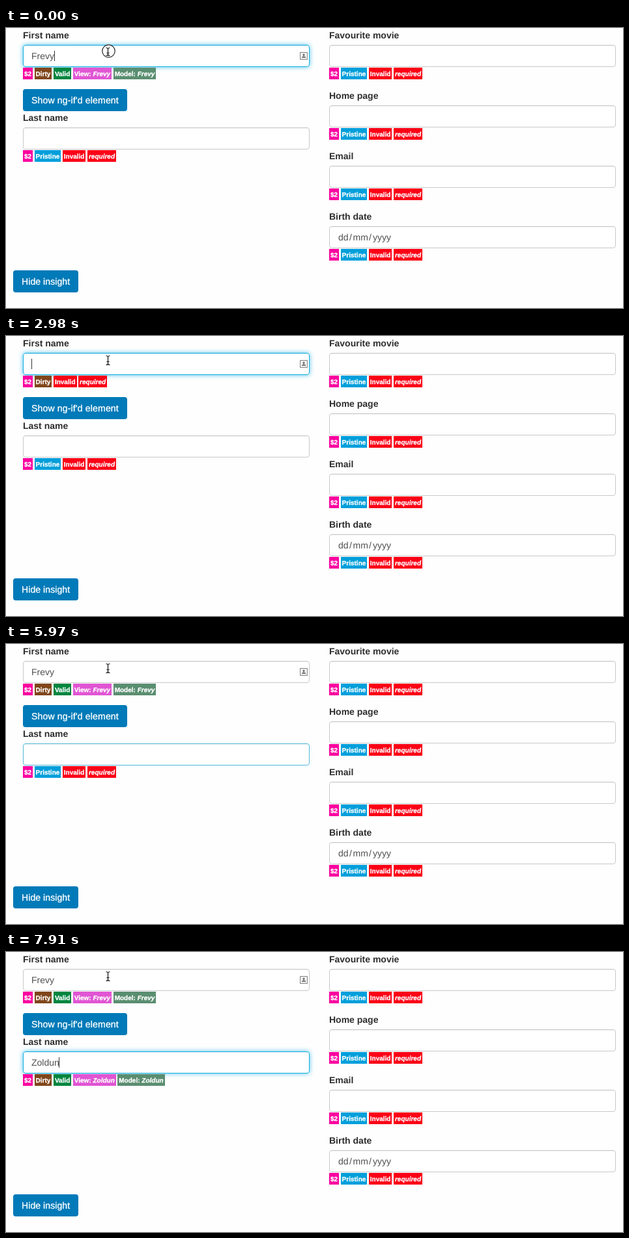
An HTML page with a canvas that plays this animation: 947x431 px, repeating every 8 s.

```html
<!DOCTYPE html>
<html lang="en">
<head>
<meta charset="utf-8">
<title>Form insight</title>
<style>
  html, body { margin: 0; width: 100%; height: 100%; overflow: hidden; background: #fefefe; }
  canvas { display: block; }
</style>
</head>
<body>
<canvas id="stage" width="947" height="431"></canvas>
<script>
const ctx = document.getElementById('stage').getContext('2d');
const LOOP = 8000;
const SANS = '"Liberation Sans", Arial, sans-serif';
const FONT = {
  label: `bold 14px ${SANS}`,
  body: `14px ${SANS}`,
  tag: `bold 10px ${SANS}`,
  tagItalic: `italic bold 10px ${SANS}`
};
const COLOR = {
  scope: '#fb009f', pristine: '#009fdb', dirty: '#80461b', valid: '#00853f',
  invalid: '#fc0016', view: '#e055d3', model: '#5a8e70'
};
const FIRST = 'Frevy';
const LAST = 'Zoldun';

// Each step overrides part of the state from its time onwards.
const STEPS = [
  [0, { first: FIRST, last: '', firstFocus: 1, lastFocus: 0, caret: 'first',
        click: true, pressed: false, selected: false }],
  [150, { click: false }],
  [450, { caret: '' }],
  [900, { caret: 'first' }],
  [1500, { caret: '' }],
  [1650, { firstFocus: 0.88, pressed: true }],
  [1800, { firstFocus: 0 }],
  [2390, { firstFocus: 0.55, pressed: false, selected: true }],
  [2540, { firstFocus: 1 }],
  [2980, { first: '', selected: false, caret: 'first' }],
  [3430, { first: FIRST.slice(0, 1) }],
  [3580, { first: FIRST.slice(0, 2) }],
  [4180, { caret: '' }],
  [4330, { first: FIRST.slice(0, 4), caret: 'first' }],
  [4930, { caret: '' }],
  [5080, { first: FIRST, caret: 'first' }],
  [5370, { firstFocus: 0.88, pressed: true, caret: '' }],
  [5520, { firstFocus: 0 }],
  [5970, { lastFocus: 0.55, pressed: false }],
  [6120, { lastFocus: 0.88, caret: 'last' }],
  [6260, { lastFocus: 1 }],
  [6710, { caret: '' }],
  [7010, { last: LAST.slice(0, 1), caret: 'last' }],
  [7160, { last: LAST.slice(0, 2) }],
  [7310, { last: LAST.slice(0, 3) }],
  [7610, { last: LAST.slice(0, 5) }],
  [7910, { last: LAST }]
];

function stateAt(time) {
  return Object.assign({}, ...STEPS.filter(([at]) => at <= time).map(step => step[1]));
}

function roundRect(x, y, w, h, r) {
  ctx.beginPath();
  ctx.roundRect(x, y, w, h, r);
}

function text(str, x, y, font, color, weight = 0, spacing = 0) {
  ctx.font = font;
  ctx.letterSpacing = `${spacing}px`;
  ctx.fillStyle = color;
  ctx.fillText(str, x, y);
  if (weight) {
    ctx.strokeStyle = color;
    ctx.lineWidth = weight;
    ctx.strokeText(str, x, y);
  }
  return ctx.measureText(str).width;
}

function widthOf(str, font) {
  ctx.font = font;
  ctx.letterSpacing = '0px';
  return ctx.measureText(str).width;
}

function mix(from, to, k) {
  return `rgb(${from.map((v, i) => Math.round(v + (to[i] - v) * k))})`;
}

function inputBox(x, y, focus = 0) {
  ctx.save();
  if (focus > 0.5) {
    ctx.shadowColor = `rgba(20,174,228,${0.75 * (focus - 0.5) * 2})`;
    ctx.shadowBlur = 7;
  }
  ctx.fillStyle = '#fff';
  roundRect(x, y, 440, 34, 4);
  ctx.fill();
  ctx.restore();
  ctx.fillStyle = 'rgba(0,0,0,0.05)';
  ctx.fillRect(x + 3, y + 1, 434, 1);
  ctx.strokeStyle = mix([200, 200, 200], [18, 174, 224], Math.min(1, focus * 1.15));
  ctx.lineWidth = 1;
  roundRect(x + 0.5, y + 0.5, 439, 33, 3.5);
  ctx.stroke();
}

function button(label, x, y, w, spacing, pressed) {
  if (pressed) {
    ctx.save();
    ctx.shadowColor = '#4ba6ee';
    ctx.shadowBlur = 4;
    ctx.fillStyle = '#69b5ee';
    roundRect(x - 1.5, y - 1.5, w + 3, 37, 4);
    ctx.fill();
    ctx.restore();
  }
  ctx.fillStyle = pressed ? '#005f91' : '#007ab8';
  roundRect(x, y, w, 34, 4);
  ctx.fill();
  text(label, x + 13, y + 22, FONT.body, '#fff', 0.35, spacing);
}

// A tag is [color, upright text, italic text].
function tags(x, y, list) {
  for (const [color, plain, italic = ''] of list) {
    const plainWidth = widthOf(plain, FONT.tag);
    const right = x + 4 + plainWidth + widthOf(italic, FONT.tagItalic);
    ctx.fillStyle = color;
    ctx.fillRect(Math.round(x), y, Math.round(right) - Math.round(x), 18);
    text(plain, x + 2, y + 13, FONT.tag, '#fff', 0.3);
    text(italic, x + 2 + plainWidth, y + 13, FONT.tagItalic, '#fff', 0.3);
    x = right + 2.5;
  }
}

function insight(value, dirty, minLength) {
  const list = [
    [COLOR.scope, '$2'],
    dirty ? [COLOR.dirty, 'Dirty'] : [COLOR.pristine, 'Pristine']
  ];
  if (value.length < minLength) {
    list.push([COLOR.invalid, 'Invalid'], [COLOR.invalid, '', value ? 'minlength' : 'required']);
    if (value) list.push([COLOR.view, 'View: ', value]);
  } else {
    list.push([COLOR.valid, 'Valid'], [COLOR.view, 'View: ', value], [COLOR.model, 'Model: ', value]);
  }
  return list;
}

function field(label, x, y, { value = '', dirty = false, minLength = 1, focus, caret, selected } = {}) {
  text(label, x, y - 10, FONT.label, '#2e2e2e');
  inputBox(x, y, focus);
  const valueWidth = widthOf(value, FONT.body);
  if (selected) {
    ctx.fillStyle = '#9dd2f8';
    ctx.fillRect(x + 13, y + 9, Math.round(valueWidth), 16);
  }
  text(value, x + 13, y + 22, FONT.body, '#505050');
  if (caret) {
    ctx.fillStyle = '#333';
    ctx.fillRect(x + 13 + Math.floor(valueWidth), y + 9, 1, 16);
  }
  tags(x, y + 35, insight(value, dirty, minLength));
}

function contactIcon(x, y) {
  ctx.strokeStyle = '#8b8b8b';
  ctx.lineWidth = 1.2;
  ctx.strokeRect(x + 0.6, y + 0.6, 10.8, 10.8);
  ctx.fillStyle = '#777';
  ctx.beginPath();
  ctx.arc(x + 6, y + 4.3, 1.7, 0, Math.PI * 2);
  ctx.fill();
  ctx.fillRect(x + 5.2, y + 5, 1.6, 2);
  ctx.fillRect(x + 3, y + 7, 6, 2);
}

function beam(x, y, half) {
  ctx.beginPath();
  for (const side of [-1, 1]) {
    ctx.moveTo(x - 3, y + side * half);
    ctx.quadraticCurveTo(x, y + side * half, x, y + side * (half - 2));
    ctx.quadraticCurveTo(x, y + side * half, x + 3, y + side * half);
  }
  ctx.moveTo(x, y - half + 1);
  ctx.lineTo(x, y + half - 1);
  ctx.moveTo(x - 2, y + 2);
  ctx.lineTo(x + 2, y + 2);
  ctx.strokeStyle = '#fff';
  ctx.lineWidth = 3;
  ctx.stroke();
  ctx.strokeStyle = '#111';
  ctx.lineWidth = 1.2;
  ctx.stroke();
}

function pointer(click) {
  if (click) {
    ctx.beginPath();
    ctx.arc(157.5, 35.5, 9.7, 0, Math.PI * 2);
    ctx.fillStyle = '#fff';
    ctx.fill();
    ctx.strokeStyle = '#222';
    ctx.lineWidth = 1.2;
    ctx.stroke();
  }
  beam(156.5, click ? 36.5 : 37.5, click ? 6 : 7);
}

function draw(time) {
  const s = stateAt(time);
  ctx.fillStyle = '#fefefe';
  ctx.fillRect(0, 0, 947, 431);

  field('First name', 26, 26, {
    value: s.first, dirty: true, minLength: 3, focus: s.firstFocus,
    caret: s.caret === 'first', selected: s.selected
  });
  contactIcon(451, 37);
  field('Last name', 26, 153, {
    value: s.last, dirty: s.last !== '', focus: s.lastFocus, caret: s.caret === 'last'
  });
  button("Show ng-if'd element", 26, 94, 160, 0.18, s.pressed);

  ['Favourite movie', 'Home page', 'Email', 'Birth date'].forEach((label, i) =>
    field(label, 496, 26 + 93 * i));
  [['dd', 510], ['/', 527], ['mm', 532.5], ['/', 557], ['yyyy', 563]].forEach(([part, x]) =>
    text(part, x, 327, FONT.body, '#505050'));

  button('Hide insight', 11, 373, 100, 0.08, false);
  pointer(s.click);
}

function tick() {
  draw(performance.now() % LOOP);
  requestAnimationFrame(tick);
}

ctx.textRendering = 'geometricPrecision';
ctx.lineJoin = 'round';
tick();
</script>
</body>
</html>
```
